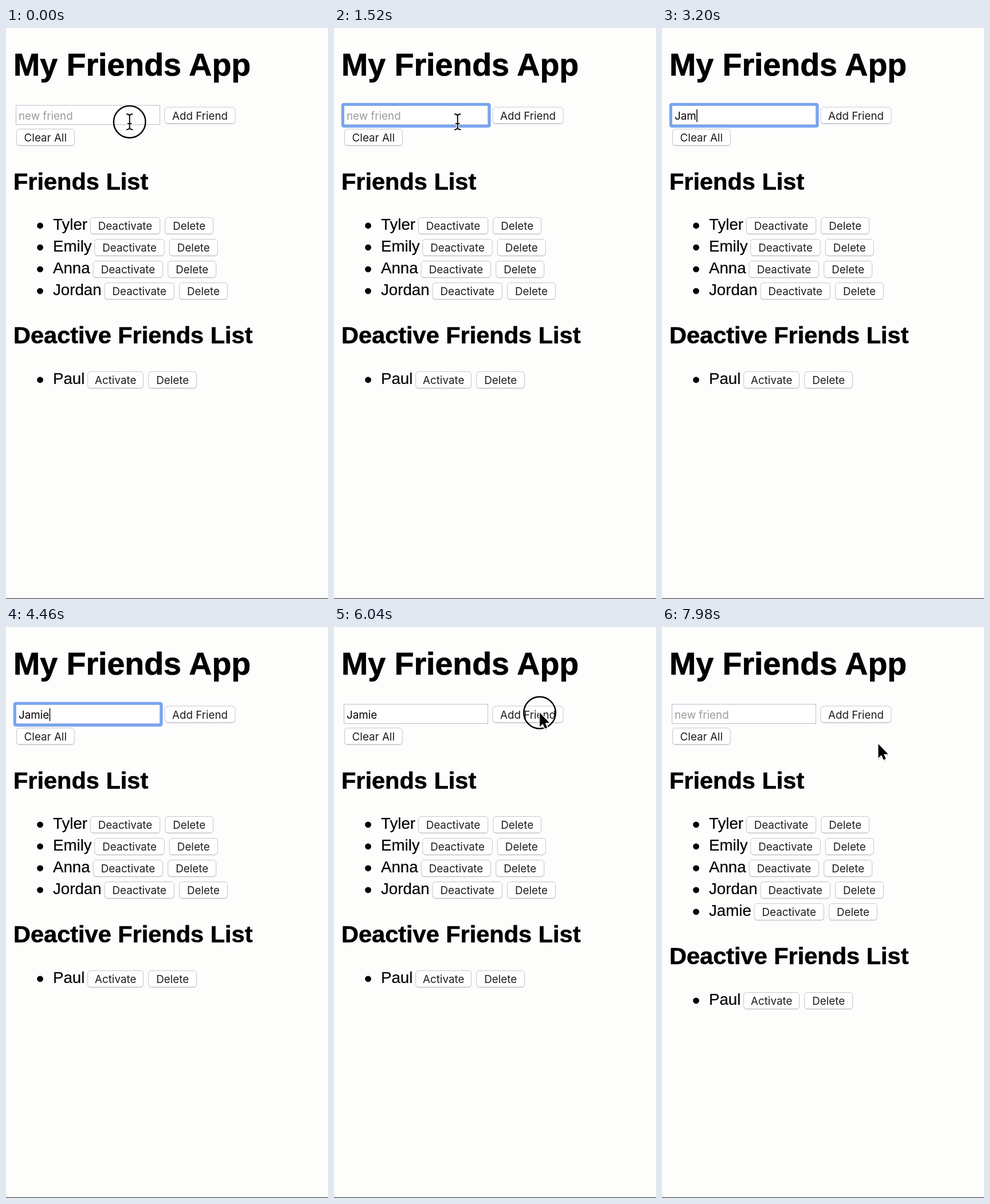
These frames come from a looping animation (562 px wide and 996 px high, 8 s). An HTML page:

```html
<!DOCTYPE html>
<html lang="en">
<head>
<meta charset="utf-8">
<title>Friends</title>
<style>
  html, body { margin: 0; width: 100%; height: 100%; overflow: hidden; background: #fdfdfc; }
  svg { display: block; width: 100%; height: 100%; }
  text { font: 27.7px "Liberation Sans", Arial, sans-serif; white-space: pre; stroke: #000; stroke-width: .2; }
  .h1 { font-size: 55.5px; font-weight: bold; stroke-width: .7; }
  .h2 { font-size: 41.5px; font-weight: bold; stroke-width: .6; }
  .ui { font: 18.8px Inter, sans-serif; fill: #1c1c1c; stroke: none; }
  .button { fill: #fff; stroke: #c6c6ce; }
  .halo { stroke: #fff; stroke-linejoin: round; }
</style>
</head>
<body>
<svg viewBox="0 0 562 996">
  <rect width="562" height="996" fill="#fdfdfc"/>
  <rect y="994.5" width="562" height="1.5" fill="#6c6c72"/>
  <text class="h1" x="13" y="83.2">My Friends App</text>

  <rect x="17.5" y="135" width="251" height="33.5" fill="#fff" stroke="#bcbcd2"/>
  <rect id="focus" x="15.2" y="133.2" width="256" height="38" rx="2" fill="none" stroke="#78a5ef" stroke-width="5"/>
  <text id="value" class="ui" x="22" y="160"></text>
  <rect id="caret" y="142" width="1.5" height="22"/>

  <g id="form"></g>
  <text class="h2" x="13" y="282">Friends List</text>
  <g id="active"></g>
  <g id="added"></g>
  <g id="inactive"><text class="h2" x="13" y="550">Deactive Friends List</text></g>

  <circle id="press" r="27.8" fill="none" stroke="#000" stroke-width="2.4"/>
  <g id="beam" fill="none" stroke-linecap="round">
    <path class="halo" stroke-width="4.5" d="M-5-13.5Q0-13.5 0-9V9Q0 13.5-5 13.5M5-13.5Q0-13.5 0-9M0 9Q0 13.5 5 13.5M-3 3H3"/>
    <path stroke="#000" stroke-width="1.9" d="M-5-13.5Q0-13.5 0-9V9Q0 13.5-5 13.5M5-13.5Q0-13.5 0-9M0 9Q0 13.5 5 13.5M-3 3H3"/>
  </g>
  <g id="arrow">
    <path d="M0 0V24.5L5.6 19.2 9.2 27.8 13.2 26.1 9.6 17.7H17.2Z" fill="#000" opacity=".14" transform="translate(1 3)"/>
    <path class="halo" stroke-width="3" d="M0 0V24.5L5.6 19.2 9.2 27.8 13.2 26.1 9.6 17.7H17.2Z"/>
    <path d="M0 0V24.5L5.6 19.2 9.2 27.8 13.2 26.1 9.6 17.7H17.2Z"/>
  </g>
</svg>
<script>
const LOOP = 8000, ROW = 38;
const FOCUS = 60, BLUR = 5900, ADD = 6060;
const PRESSES = [[0, 200], [5880, 6060]];
const KEYS = [[2760, "J"], [2920, "Ja"], [3080, "Jam"], [3240, "Jami"], [3440, "Jamie"]];
const HIDE = KEYS[0][0], SHOW = 5040;
// Pointer stops: time, x, y
const PATH = [[0, 215.7, 163.7], [SHOW, 215.7, 163.7], [5300, 372.5, 133],
  [5420, 372.5, 133], [5700, 359, 149.5], [7560, 359, 149.5], [7860, 377.5, 204]];

const $ = id => document.getElementById(id);
const show = (id, on) => $(id).setAttribute("visibility", on ? "visible" : "hidden");
const place = (id, x, y) => $(id).setAttribute("transform", `translate(${x} ${y})`);

const button = (x, y, width, label) =>
  `<rect x="${x}" y="${y + 1.6}" width="${width}" height="28.6" rx="5" fill="#c9c9cd"/>
   <rect class="button" x="${x}" y="${y + .5}" width="${width}" height="28.6" rx="5"/>
   <text class="ui" x="${x + width / 2}" y="${y + 22}" text-anchor="middle">${label}</text>`;

const friend = (name, top, x, label = "Deactivate", width = 121.5) =>
  `<circle cx="59.5" cy="${top + 14.8}" r="5.4"/>
   <text x="82" y="${top + 22}">${name}</text>` +
  button(x, top, width, label) + button(x + width + 9, top, 84, "Delete");

$("form").innerHTML = button(277, 137.5, 123, "Add Friend") + button(18.3, 175.7, 101, "Clear All");
$("active").innerHTML = [["Tyler", 147.2], ["Emily", 154.8], ["Anna", 152.2], ["Jordan", 172]]
  .map(([name, x], i) => friend(name, 330 + i * ROW, x)).join("");
$("added").innerHTML = friend("Jamie", 330 + 4 * ROW, 161);
$("inactive").innerHTML += friend("Paul", 599, 142.7, "Activate", 97);

function pointerAt(t) {
  const next = PATH.findIndex(stop => stop[0] > t);
  if (next < 0) return PATH.at(-1).slice(1);
  const [t0, x0, y0] = PATH[next - 1], [t1, x1, y1] = PATH[next];
  const p = (t - t0) / (t1 - t0), e = p * p * (3 - 2 * p);
  return [x0 + (x1 - x0) * e, y0 + (y1 - y0) * e];
}

function draw(t) {
  const focused = t >= FOCUS && t < BLUR, added = t >= ADD;
  const key = KEYS.findLast(k => k[0] <= t);
  const typed = key && !added ? key[1] : "";
  const value = $("value");
  value.textContent = typed || "new friend";
  value.style.fill = typed ? "#000" : "#9b9b9b";

  // The caret blinks once a second, restarting at each key
  const blink = (t - (key ? key[0] : 20)) % 1000;
  show("focus", focused);
  show("caret", focused && blink < 500);
  $("caret").setAttribute("x", typed ? 22.5 + value.getComputedTextLength() : 22);

  show("added", added);
  place("inactive", 0, added ? ROW : 0);

  const [x, y] = pointerAt(t), visible = t < HIDE || t >= SHOW, overInput = x < 270;
  for (const id of ["beam", "arrow", "press"]) place(id, x, y);
  show("beam", visible && overInput);
  show("arrow", visible && !overInput);
  show("press", PRESSES.some(([from, to]) => t >= from && t < to));
}

const start = performance.now();
(function tick() {
  draw((performance.now() - start) % LOOP);
  requestAnimationFrame(tick);
})();
</script>
</body>
</html>
```
